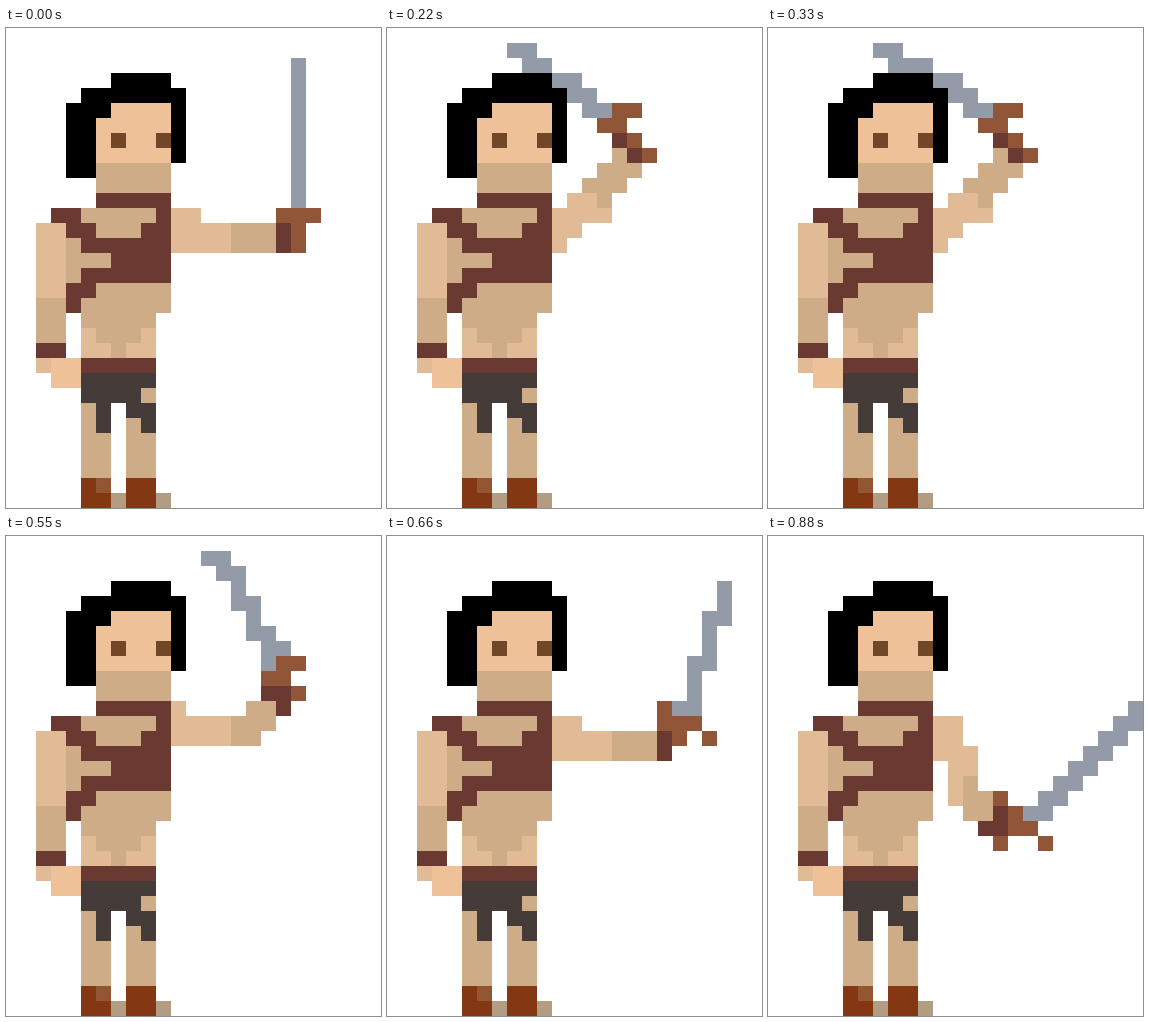
Write an HTML page with a canvas that moves like this. It is 375 by 480 pixels and loops after 990 ms.

```html
<!DOCTYPE html>
<html lang="en">
<head>
<meta charset="utf-8">
<title>Swordsman</title>
<style>
  html, body { margin: 0; width: 100%; height: 100%; overflow: hidden; background: #fff; }
  canvas { display: block; width: 375px; height: 480px; }
</style>
</head>
<body>
<canvas id="stage" width="375" height="480"></canvas>
<script>
const CELL = 15, STEP = 110;
const ctx = document.getElementById('stage').getContext('2d');

// Each brush fills a block of grid cells: column, row, width, height.
const brush = color => (x, y, w = 1, h = 1) => {
  ctx.fillStyle = color;
  ctx.fillRect(x * CELL, y * CELL, w * CELL, h * CELL);
};

const hair = brush('#000000');
const face = brush('#efc198');
const skin = brush('#e1ba96');
const tan = brush('#cfac88');
const strap = brush('#693932');
const eye = brush('#714727');
const cloth = brush('#453c39');
const boot = brush('#843713');
const cuff = brush('#925633');
const sole = brush('#b39d82');
const steel = brush('#949ba8');
const hilt = brush('#915537');

// Diagonal staircase of equal blocks going down row by row.
function stairs(paint, x, y, dx, count, w = 2) {
  for (let i = 0; i < count; i++) paint(x + dx * i, y + i, w);
}

function drawHead() {
  hair(7, 3, 4);
  hair(5, 4, 7);
  hair(4, 5, 3);
  hair(4, 6, 2, 4);
  hair(11, 5, 1, 4);
  face(7, 5, 4);
  face(6, 6, 5, 3);
  eye(7, 7);
  eye(10, 7);
  tan(6, 9, 5, 2);
}

function drawTorso() {
  tan(5, 12, 6, 7);
  tan(4, 14, 1, 3);
  tan(5, 19, 5, 3);
  skin(5, 20, 1, 2);
  skin(6, 21);
  skin(9, 20, 1, 2);
  skin(8, 21);

  strap(6, 11, 5);
  strap(3, 12, 2);
  strap(10, 12);
  strap(4, 13, 2);
  strap(9, 13, 2);
  strap(5, 14, 6);
  strap(7, 15, 4);
  strap(5, 16, 6);
  strap(4, 17, 2);
  strap(4, 18);

  skin(2, 13, 2, 5);
  tan(2, 18, 2, 3);
  strap(2, 21, 2);
  skin(2, 22);
  face(3, 22, 2, 2);
}

function drawLegs() {
  tan(5, 24, 2, 6);
  tan(8, 24, 2, 6);
  strap(5, 22, 5);
  cloth(5, 23, 5);
  cloth(5, 24, 4);
  cloth(6, 25, 1, 2);
  cloth(8, 25, 2);
  cloth(9, 26);
  boot(5, 30, 2, 2);
  boot(8, 30, 2, 2);
  cuff(6, 30);
  sole(7, 31);
  sole(10, 31);
}

function upright() {
  skin(11, 12, 2);
  skin(11, 13, 4, 2);
  tan(15, 13, 3, 2);
  strap(18, 13, 1, 2);
  steel(19, 2, 1, 10);
  hilt(18, 12, 3);
  hilt(19, 13, 1, 2);
}

function tilted() {
  skin(11, 11);
  skin(11, 12, 4, 2);
  tan(16, 11, 2);
  tan(15, 12, 3);
  tan(15, 13, 2);
  stairs(steel, 13, 1, 1, 2);
  steel(15, 3);
  steel(15, 4, 2);
  steel(16, 5);
  stairs(steel, 16, 6, 1, 2);
  steel(17, 8);
  hilt(18, 8, 2);
  hilt(17, 9, 2);
  strap(17, 10, 2);
  strap(18, 11);
  hilt(19, 10);
}

function raisedArm() {
  tan(14, 9, 3);
  tan(13, 10, 3);
  skin(12, 11, 2);
  tan(14, 11);
  skin(11, 12, 4);
  skin(11, 13, 2);
  skin(11, 14);
  tan(15, 8);
}

function raisedGrip() {
  hilt(15, 5, 2);
  hilt(14, 6, 2);
  strap(15, 7);
  hilt(16, 7);
  strap(16, 8);
  hilt(17, 8);
}

function raised() {
  raisedArm();
  raisedGrip();
  stairs(steel, 8, 1, 1, 2);
  stairs(steel, 11, 3, 1, 3);
}

function drawnBack() {
  raisedArm();
  raisedGrip();
  steel(7, 1, 2);
  steel(8, 2, 3);
  stairs(steel, 11, 3, 1, 3);
}

function swinging() {
  tan(14, 9, 2);
  tan(13, 10, 3);
  skin(11, 11, 3, 2);
  tan(14, 11);
  tan(13, 11);
  skin(13, 11);
  skin(11, 13, 2);
  stairs(steel, 7, 0, 1, 3);
  stairs(steel, 11, 3, 1, 2);
  steel(13, 5, 3);
  steel(14, 6);
  hilt(16, 5);
  hilt(15, 6);
  hilt(14, 7);
  strap(15, 7, 1, 2);
  hilt(16, 7);
  strap(16, 8, 1, 2);
  hilt(17, 8);
}

function leaning() {
  skin(11, 12, 2);
  skin(11, 13, 4, 2);
  tan(15, 13, 3, 2);
  strap(18, 13, 1, 2);
  steel(22, 3, 1, 3);
  steel(21, 5, 1, 4);
  steel(20, 8, 1, 4);
  steel(19, 11);
  hilt(18, 11);
  hilt(18, 12, 3);
  hilt(19, 13);
  hilt(21, 13);
}

function lowering() {
  skin(11, 12, 2);
  skin(11, 13, 3);
  skin(11, 14, 4);
  skin(13, 15);
  tan(14, 15, 3);
  tan(14, 16, 3);
  tan(15, 17);
  steel(23, 7, 1, 2);
  steel(22, 9, 2);
  steel(22, 10);
  stairs(steel, 21, 11, -1, 2);
  steel(20, 13);
  stairs(steel, 19, 14, -1, 2);
  steel(19, 16);
  stairs(hilt, 17, 15, 1, 3, 1);
  stairs(hilt, 17, 17, -1, 2, 1);
  strap(17, 16);
  strap(16, 17);
}

function lowered() {
  skin(11, 12, 2, 2);
  skin(11, 14, 3);
  skin(12, 15, 2);
  skin(12, 16, 1, 2);
  tan(13, 16);
  tan(13, 17, 2, 2);
  steel(24, 11);
  stairs(steel, 23, 12, -1, 7);
  hilt(15, 17);
  strap(15, 18);
  hilt(16, 18);
  strap(14, 19, 2);
  hilt(16, 19, 2);
  hilt(15, 20);
  hilt(18, 20);
}

const poses = [upright, tilted, raised, drawnBack, swinging, tilted, leaning, lowering, lowered];

function draw() {
  const pose = Math.floor(performance.now() / STEP) % poses.length;
  ctx.fillStyle = '#fff';
  ctx.fillRect(0, 0, 375, 480);
  poses[pose]();
  drawTorso();
  drawLegs();
  drawHead();
  requestAnimationFrame(draw);
}
draw();
</script>
</body>
</html>
```
